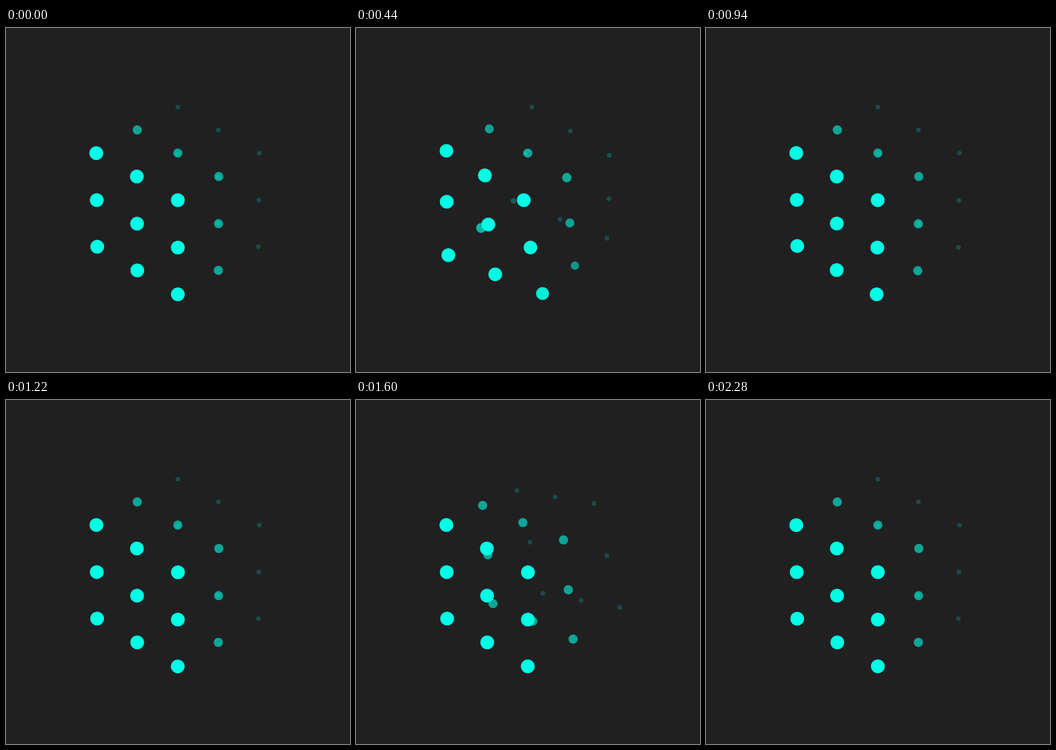
An HTML page that plays this animation: 600x600 px, repeating every 2.4 s.

```html
<!DOCTYPE html>
<html lang="en">
<head>
<meta charset="utf-8">
<title>Dot cube</title>
<style>
  html, body { margin: 0; width: 100%; height: 100%; overflow: hidden; background: #212021; }
  svg { display: block; width: 100vw; height: 100vh; }
</style>
</head>
<body>
<svg id="stage" viewBox="0 0 600 600"></svg>
<script>
const LOOP = 2400, TURN = 1200, LAG = 60, SPIN = 1000;
const GAP = 100, VIEW = 10000, CX = 299.7, CY = 300.3;
const X = GAP * Math.SQRT1_2, Y = GAP * Math.sqrt(2 / 3), Z = GAP / Math.sqrt(3);

// Easing knots: time, value, slope
const KNOTS = [
  [0, 0, 0], [.14, .167, 3.3], [.2, .46, 5.1], [.27, .757, 3.1],
  [.34, .92, 1.75], [.4, 1, .95], [.6, 1.048, -.22], [.8, 1.0115, -.116], [1, 1, 0]
];

function ease(u) {
  if (u <= 0) return 0;
  if (u >= 1) return 1;
  const i = KNOTS.findIndex(k => k[0] > u);
  const [t0, y0, m0] = KNOTS[i - 1], [t1, y1, m1] = KNOTS[i];
  const d = t1 - t0, h = (u - t0) / d, g = 1 - h;
  return y0 * g * g * (1 + 2 * h) + y1 * h * h * (3 - 2 * h)
       + d * h * g * (m0 * g - m1 * h);
}

function rotate(p, q, angle) {
  const c = Math.cos(angle), s = Math.sin(angle);
  return [p * c - q * s, p * s + q * c];
}

// Cells left empty: [first turn, second turn]
const EMPTY = [["0,0,0", "-1,0,0", "0,1,0"], ["0,0,0", "0,0,1"]];
const SIDE = [-1, 0, 1];
const cells = SIDE.flatMap(a => SIDE.flatMap(b => SIDE.map(c => [a, b, c])));
const cubes = EMPTY.map(skip => cells.filter(p => !skip.includes(p.join())));

// Turn 0 spins the horizontal layers, turn 1 the layers facing left.
function place([a, b, c], turn, t) {
  const layer = turn ? c : b;
  const angle = Math.PI / 2 * ease((t - (layer + 1) * LAG) / SPIN);
  if (turn) [a, b] = rotate(a, b, angle);
  else [a, c] = rotate(a, c, -angle);
  const near = a - b - c;
  const k = VIEW / (VIEW - near * Z);
  const w = Math.max(-1, Math.min(1, c));
  return {
    near,
    x: CX + k * X * (a + c),
    y: CY + k * Y * (b + (a - c) / 2),
    r: 8 - 4 * w,
    alpha: .6 - .4 * w
  };
}

const stage = document.getElementById("stage");
const dots = cells.map(() => {
  const dot = document.createElementNS("http://www.w3.org/2000/svg", "circle");
  dot.setAttribute("fill", "#00ffe5");
  return stage.appendChild(dot);
});

function draw(time) {
  const t = time % LOOP, turn = t < TURN ? 0 : 1;
  const list = cubes[turn].map(p => place(p, turn, t - turn * TURN))
    .sort((p, q) => p.near - q.near);
  dots.forEach((dot, i) => {
    const p = list[i];
    dot.setAttribute("r", p ? p.r.toFixed(3) : 0);
    if (!p) return;
    dot.setAttribute("cx", p.x.toFixed(3));
    dot.setAttribute("cy", p.y.toFixed(3));
    dot.setAttribute("fill-opacity", p.alpha.toFixed(4));
  });
}

const start = performance.now();
function tick() {
  draw(performance.now() - start);
  requestAnimationFrame(tick);
}
tick();
</script>
</body>
</html>
```
